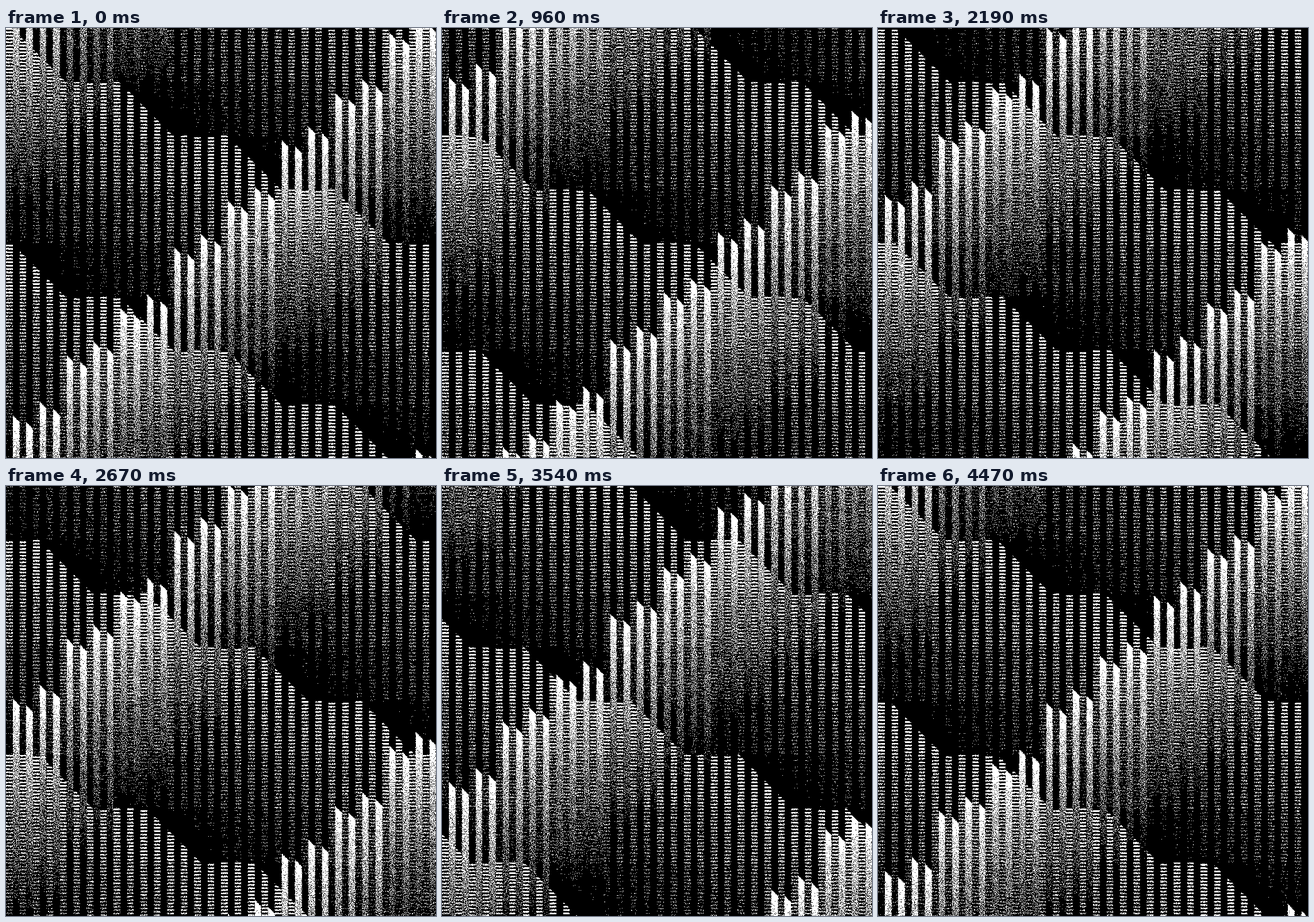
Write an HTML page without scripts that moves like this. It is 748 px wide and 748 px high and loops after 4.5 s.

```html
<!DOCTYPE html>
<html lang="en">
<head>
<meta charset="utf-8">
<title>Dithered columns</title>
<style>
  html, body { margin: 0; width: 100%; height: 100%; overflow: hidden; background: #000; }
  /* Grey levels averaged with noise, then hard-thresholded: a random dither */
  .stage { position: relative; width: 748px; height: 748px; overflow: hidden; background: #000; filter: contrast(400); }
  .stage svg { position: absolute; inset: 0; width: 748px; height: 748px; }
  .scene { shape-rendering: crispEdges; }
  .noise { opacity: .49; will-change: transform; }
  .wave { mix-blend-mode: lighten; }
  .slide, .fall { animation: slide 4500ms steps(150) infinite; }
  .fall { animation-name: fall; }
  @keyframes slide { to { transform: translateX(-512px); } }
  @keyframes fall { to { transform: translateY(256px); } }
</style>
</head>
<body>
<div class="stage">
  <!-- One unit is one cell of a 256 x 256 grid -->
  <svg class="scene" viewBox="0 0 256 256">
    <defs>
      <!-- Alternate waves: each gradient lights one half of the cycle -->
      <linearGradient id="even" gradientUnits="userSpaceOnUse" x1="0" y1="0" x2="-256" y2="256" spreadMethod="repeat">
        <stop stop-color="#fff"/><stop offset=".5"/><stop offset="1"/>
      </linearGradient>
      <linearGradient id="odd" gradientUnits="userSpaceOnUse" x1="0" y1="0" x2="-256" y2="256" spreadMethod="repeat">
        <stop/><stop offset=".5"/><stop offset=".5" stop-color="#fff"/><stop offset="1"/>
      </linearGradient>
      <linearGradient id="fade" gradientUnits="userSpaceOnUse" x1="0" y1="0" x2="0" y2="128">
        <stop stop-color="#fff"/><stop offset=".5" stop-color="#727272"/><stop offset="1"/>
      </linearGradient>

      <!-- Black covers that leave striped columns open, one row apart -->
      <pattern id="coverEven" width="32" height="2" patternUnits="userSpaceOnUse">
        <path id="gaps" d="M4 0h4v2h-4z M12 0h4v2h-4z M20 0h4v2h-4z M28 0h4v2h-4z"/>
        <path d="M0 1h4v1h-4z M8 1h4v1h-4z M16 0h4v1h-4z M24 0h4v1h-4z"/>
      </pattern>
      <pattern id="coverOdd" width="32" height="2" patternUnits="userSpaceOnUse">
        <use href="#gaps"/>
        <path d="M0 0h4v1h-4z M8 0h4v1h-4z M16 1h4v1h-4z M24 1h4v1h-4z"/>
      </pattern>

      <!-- Bands inherit their fill from the wave that uses them -->
      <rect id="band" x="-1024" width="2048" height="32"/>
      <g id="bands2"><use href="#band"/><use href="#band" x="64" y="32"/></g>
      <g id="bands4"><use href="#bands2"/><use href="#bands2" x="128" y="64"/></g>
      <g id="bands8"><use href="#bands4"/><use href="#bands4" x="256" y="128"/></g>

      <!-- Bars double up; each doubling has its own offset -->
      <rect id="bar" width="4" height="128" fill="url(#fade)" transform="skewY(45)"/>
      <g id="bars2"><use href="#bar"/><use href="#bar" x="8" y="4"/></g>
      <g id="bars4"><use href="#bars2"/><use href="#bars2" x="16" y="-8"/></g>
      <g id="bars8"><use href="#bars4"/><use href="#bars4" x="32" y="-36"/></g>
      <g id="bars16"><use href="#bars8"/><use href="#bars8" x="64" y="-64"/></g>
      <g id="bars32"><use href="#bars16"/><use href="#bars16" x="128" y="-128"/></g>
    </defs>

    <g class="wave">
      <g class="slide"><use href="#bands8" x="3.5" fill="url(#even)"/></g>
      <rect width="256" height="256" fill="url(#coverEven)"/>
    </g>
    <g class="wave">
      <g class="slide"><use href="#bands8" x="3.5" fill="url(#odd)"/></g>
      <rect width="256" height="256" fill="url(#coverOdd)"/>
    </g>
    <g class="fall">
      <use href="#bars32" x="4" y="486.5"/>
      <use href="#bars32" x="4" y="230.5"/>
      <use href="#bars32" x="4" y="-25.5"/>
      <use href="#bars32" x="4" y="-281.5"/>
    </g>
  </svg>

  <svg class="noise" viewBox="0 0 748 748">
    <filter id="grain" x="0" y="0" width="100%" height="100%" color-interpolation-filters="sRGB">
      <feTurbulence type="fractalNoise" baseFrequency=".713 .737" numOctaves="2" seed="7"/>
      <!-- Spread the bell-shaped noise evenly over all levels, then copy it to grey -->
      <feComponentTransfer>
        <feFuncA type="table" tableValues="0 0 .006 .048 .2 .5 .8 .952 .994 1 1"/>
      </feComponentTransfer>
      <feColorMatrix values="0 0 0 1 0  0 0 0 1 0  0 0 0 1 0  0 0 0 0 1"/>
    </filter>
    <rect width="748" height="748" filter="url(#grain)"/>
  </svg>
</div>
</body>
</html>
```
